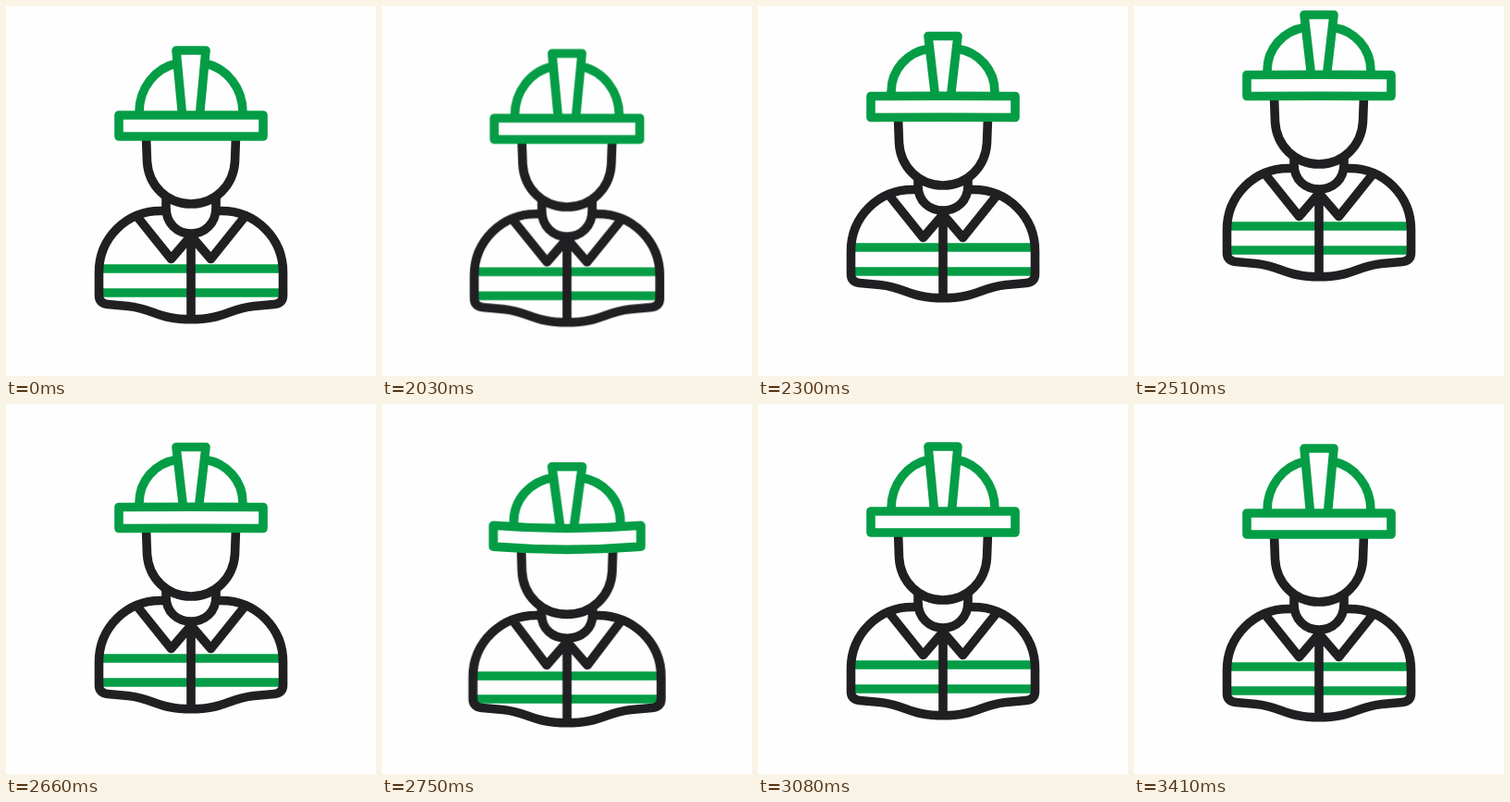
Recreate the animation shown at these times as an HTML page without scripts. Size 400x400 px, loop 3.47 s.

```html
<!DOCTYPE html>
<html lang="en">
<head>
<meta charset="utf-8">
<title>Jumping builder</title>
<style>
html, body { margin: 0; height: 100%; overflow: hidden; background: #fefefe; }
svg { display: block; width: 100vw; height: 100vh; }

#worker {
  fill: none; stroke: #201f21; stroke-width: 9.6; stroke-linejoin: round;
  transform-origin: 200px 0;
  animation: jump 3470ms steps(2) infinite;
}
.green { stroke: #049d46; }
path { d: var(--rest); animation: pose 3470ms steps(1) infinite; }

/* Poses: rest, squash (crouch and landing), air, settle */
#stripes {
  --rest: path("M104 284 H296 M104 310 H296");
  --squash: path("M104 294 H296 M104 317.5 H296");
}
#body {
  --rest: path("M173 221.5 H167 C130 221.5 100.5 251 100.5 288 V313 C100.5 319 104 322 110 322.5 L132 324.5 C160 327.5 165 338.8 200 338.8 C235 338.8 240 327.5 268 324.5 L290 322.5 C296 322 299.5 319 299.5 313 V288 C299.5 251 270 221.5 233 221.5 H227");
  --squash: path("M173 224 H168 C130 224 100.5 254 100.5 290 V313 C100.5 319 104 322 110 322.5 L132 324.5 C160 327.5 165 338.8 200 338.8 C235 338.8 240 327.5 268 324.5 L290 322.5 C296 322 299.5 319 299.5 313 V290 C299.5 254 270 224 232 224 H227");
}
#collar {
  --rest: path("M142 228 L178.500 273.500 L200 248.500 L221.500 273.500 L258 228 M200 248.500 V339");
  --squash: path("M145 230 L178.500 280.500 L200 255 L221.500 280.500 L255 230 M200 255 V339");
}
#neck {
  --rest: path("M173 208 V218 C173 235 185 246 200 246 C215 246 227 235 227 218 V208");
  --squash: path("M173 222 V228 C173 243 185 252 200 252 C215 252 227 243 227 228 V222");
  --air: path("M173 210 V217 C173 234 185 244 200 244 C215 244 227 234 227 217 V210");
  --settle: path("M173 208 V216 C173 233 185 244 200 244 C215 244 227 233 227 216 V208");
}
#face {
  --rest: path("M151.500 141 L152.500 168 C154 194 174 214 200 214 C226 214 246 194 247.500 168 L248.500 141");
  --squash: path("M151.500 158 L152 181 C153 209 174 228 200 228 C226 228 247 209 248 181 L248.500 158");
  --air: path("M151.500 144 L152.500 171 C154 197 174 217 200 217 C226 217 246 197 247.500 171 L248.500 144");
}
#dome {
  --rest: path("M144 117 V115 C144 89 161 67 185 62 M256 117 V115 C256 89 239 67 215 62");
  --squash: path("M143 136 V132 C142 106 160 84 186 80 M257 136 V132 C258 106 240 84 214 80");
  --air: path("M144 120 V116 C144 92 161 73 185 69 M256 120 V116 C256 92 239 73 215 69");
}
#ridge {
  --rest: path("M190.500 117 L184 48 H216 L209.500 117");
  --squash: path("M195 140 L184 71 H216 L205 140");
  --air: path("M191.500 120 L184 55.500 H216 L208.500 120");
}
#brim {
  --rest: path("M122 118 Q200 118 278 118 V141 Q200 141 122 141 Z");
  --squash: path("M122 132.500 Q200 149.500 278 132.500 V155 Q200 172 122 155 Z");
  --air: path("M122 120.500 Q200 120 278 120.500 V143.500 Q200 143 122 143.500 Z");
}

@keyframes pose {
  0% { d: var(--rest); }
  58.49% { d: var(--rest); animation-timing-function: steps(4); }
  61.95% { d: var(--squash); }
  62.81% { d: var(--squash); animation-timing-function: steps(4); }
  66.27% { d: var(--air, var(--rest)); }
  77.51% { d: var(--air, var(--rest)); animation-timing-function: steps(5); }
  81.83% { d: var(--squash); }
  83.56% { d: var(--squash); animation-timing-function: steps(5); }
  87.88%, 100% { d: var(--settle, var(--rest)); }
}

@keyframes jump {
  0% { transform: none; animation-timing-function: steps(1); }
  58.49% { transform: translateY(3.3px) scaleX(1.008); }
  60.22% { transform: translateY(7px) scaleX(1.022); }
  61.95% { transform: translateY(8px) scaleX(1.026); }
  63.68% { transform: translateY(3px) scaleX(1.01); }
  65.41% { transform: translateY(-13px) scaleX(1); animation-timing-function: steps(1); }
  66.27% { transform: translateY(-23px) scaleX(1); animation-timing-function: steps(1); }
  67.14% { transform: translateY(-31px) scaleX(1); }
  68.86% { transform: translateY(-44px) scaleX(1); }
  70.59% { transform: translateY(-48.5px) scaleX(1); }
  72.32% { transform: translateY(-46px) scaleX(1); animation-timing-function: steps(1); }
  73.19% { transform: translateY(-42px) scaleX(1); }
  74.92% { transform: translateY(-28px) scaleX(1); }
  76.65% { transform: translateY(-9px) scaleX(1); }
  78.37% { transform: translateY(4px) scaleX(1.012); }
  80.1% { transform: translateY(8px) scaleX(1.032); }
  81.83% { transform: translateY(6px) scaleX(1.026); }
  83.56% { transform: translateY(2px) scaleX(1.013); }
  85.29% { transform: translateY(0) scaleX(1.004); }
  87.02% { transform: translateY(-2px) scaleX(1); }
  88.75% { transform: translateY(-2px) scaleX(1); animation-timing-function: steps(3); }
  91.34% { transform: translateY(1px) scaleX(1.002); animation-timing-function: steps(3); }
  93.94% { transform: translateY(2px) scaleX(1.004); animation-timing-function: steps(5); }
  98.26%, 100% { transform: none; }
}
</style>
</head>
<body>
<svg viewBox="0 0 400 400">
  <g id="worker">
    <path id="stripes" class="green"/>
    <path id="body"/>
    <path id="collar"/>
    <path id="neck"/>
    <path id="face"/>
    <path id="dome" class="green" stroke-linecap="round"/>
    <path id="ridge" class="green"/>
    <path id="brim" class="green"/>
  </g>
</svg>
</body>
</html>
```
